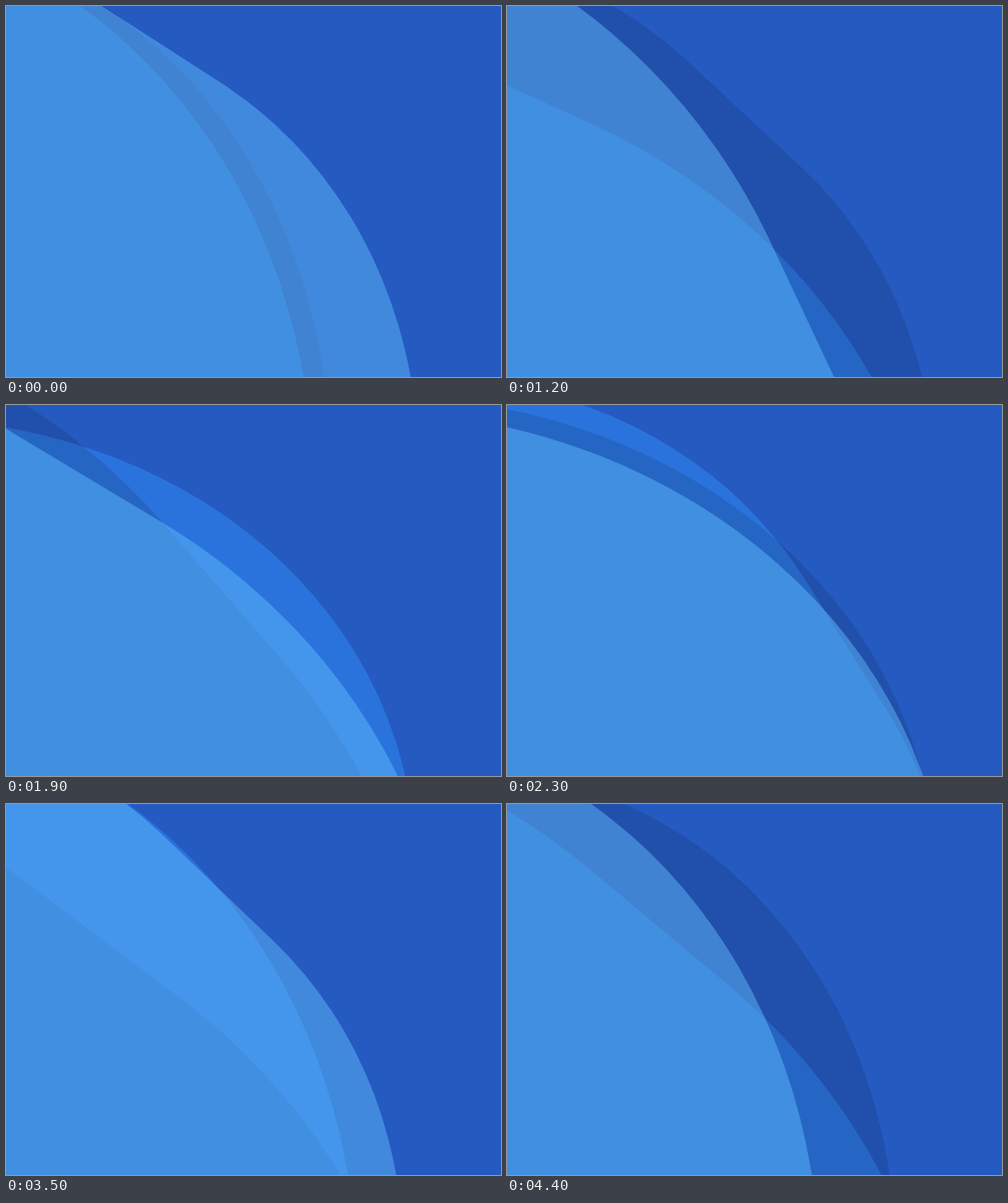
These frames come from a looping animation (558 px wide and 418 px high, 4.5 s). An HTML page:

```html
<!DOCTYPE html>
<html lang="en">
<head>
<meta charset="utf-8">
<title>Drifting waves</title>
<style>
  html, body {
    margin: 0;
    width: 100%;
    height: 100%;
    overflow: hidden;
    background: #255ac1;
  }
  #stage {
    position: relative;
    width: 558px;
    height: 418px;
    overflow: hidden;
  }
  .wave {
    position: absolute;
    left: -963px;
    top: 38px;
    width: 1442px;
    height: 1238px;
    border-radius: 43%;
    transform-origin: 50% 48%;
  }
  .bright { background: #2a73dd; }
  .shade { background: rgba(0, 0, 0, .11); }
  .light { background: rgba(100, 192, 255, .45); }
</style>
</head>
<body>
<div id="stage">
  <div class="wave bright"></div>
  <div class="wave shade"></div>
  <div class="wave light"></div>
</div>
<script>
  const LOOP = 4500, STEP = 100;

  // Start angle in degrees and time of one counter-clockwise turn in ms
  const drifts = [
    { start: 86.2, turn: 7000 },
    { start: 97, turn: 3000 },
    { start: -57.2, turn: 7450 }
  ];
  const waves = document.querySelectorAll('.wave');
  const begin = performance.now();

  function draw() {
    const elapsed = (performance.now() - begin) % LOOP;
    const time = Math.floor(elapsed / STEP) * STEP;
    drifts.forEach(({ start, turn }, i) => {
      waves[i].style.transform = `rotate(${start - 360 * time / turn}deg)`;
    });
    requestAnimationFrame(draw);
  }
  draw();
</script>
</body>
</html>
```
